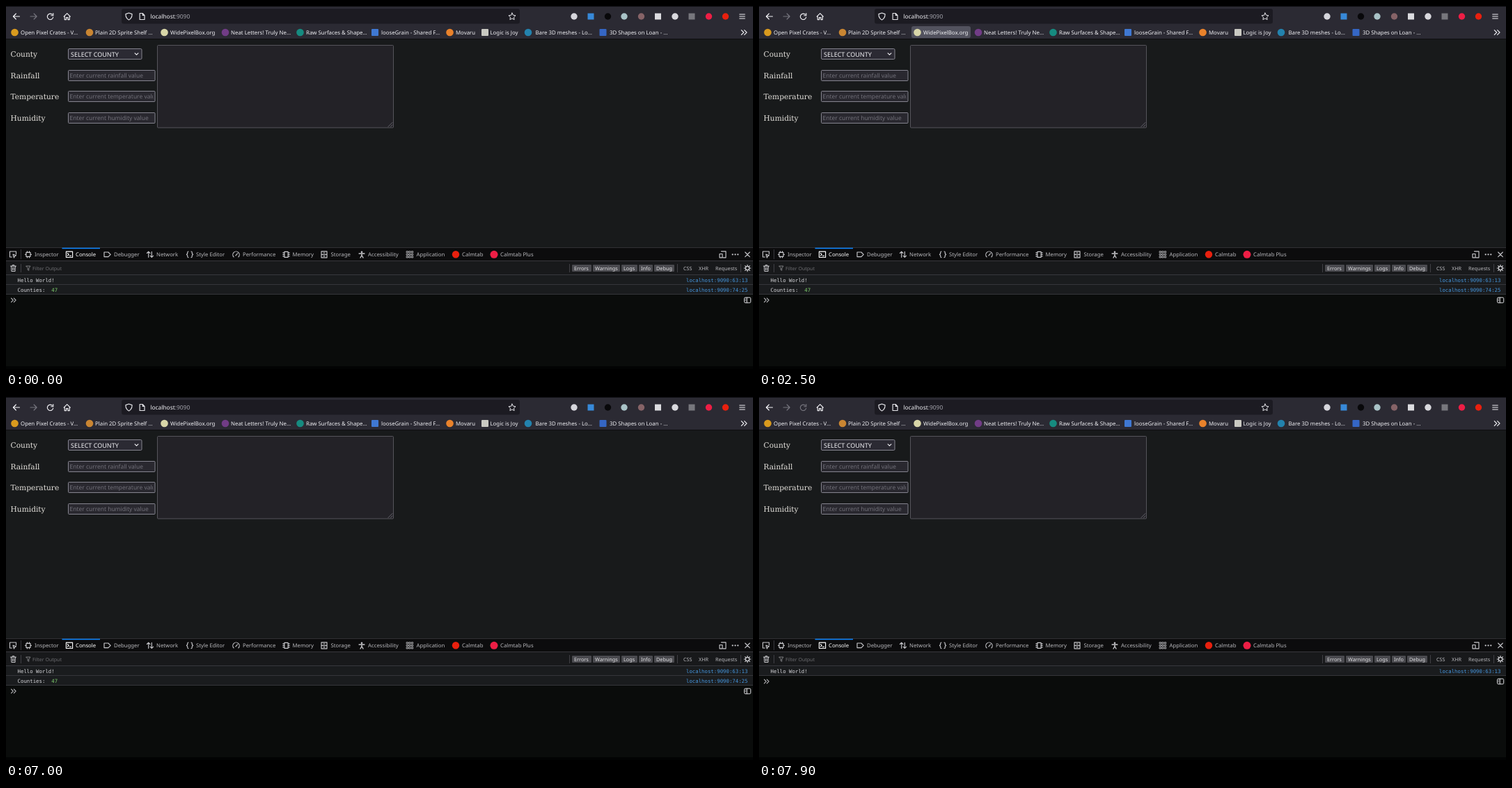
Write an HTML page with a canvas that moves like this. It is 1073x522 px and loops after 8 s.

```html
<!DOCTYPE html>
<html lang="en">
<head>
<meta charset="utf-8">
<title>County form</title>
<style>
html, body { margin: 0; width: 100%; height: 100%; overflow: hidden; background: #0b0d0c; }
canvas, svg { position: absolute; left: 0; top: 0; width: 1073px; height: 522px; }
text { white-space: pre; text-rendering: geometricPrecision; }
</style>
</head>
<body>
<canvas id="stage" width="1073" height="522"></canvas>
<svg id="labels" viewBox="0 0 1073 522">
  <clipPath id="field"><rect x="90" y="120" width="121.5" height="20"/></clipPath>
</svg>
<script>
const LOOP = 8000;
const SANS = '"Noto Sans", sans-serif';
const SERIF = '"DejaVu Serif", "Noto Serif", serif';
const MONO = '"DejaVu Sans Mono", monospace';
const ctx = document.getElementById('stage').getContext('2d');
const svg = document.getElementById('labels');

function label(str, x, y, size, fill, font = SANS) {
  const el = document.createElementNS('http://www.w3.org/2000/svg', 'text');
  const attrs = { x, y, fill, 'font-size': size, 'font-family': font };
  for (const key in attrs) el.setAttribute(key, attrs[key]);
  el.textContent = str;
  svg.appendChild(el);
  return el;
}
const show = (el, on) => el.setAttribute('visibility', on ? 'visible' : 'hidden');

function rect(x, y, w, h, fill) {
  ctx.fillStyle = fill;
  ctx.fillRect(x, y, w, h);
}
function box(x, y, w, h, r, fill, stroke) {
  ctx.beginPath();
  ctx.roundRect(x, y, w, h, r);
  if (fill) { ctx.fillStyle = fill; ctx.fill(); }
  if (stroke) { ctx.strokeStyle = stroke; ctx.lineWidth = 1; ctx.stroke(); }
}
function dot(x, y, r, fill) {
  ctx.beginPath();
  ctx.arc(x, y, r, 0, 7);
  ctx.fillStyle = fill;
  ctx.fill();
}
// Strokes a path whose coordinates are relative to (x, y).
function icon(x, y, d, color = '#e6e6ea', width = 1.15, turn = 0) {
  ctx.save();
  ctx.translate(x, y);
  ctx.rotate(turn);
  ctx.strokeStyle = color;
  ctx.lineWidth = width;
  ctx.lineCap = ctx.lineJoin = 'round';
  ctx.stroke(new Path2D(d));
  ctx.restore();
}

const ring = r => `M${-r} 0a${r} ${r} 0 1 0 ${2 * r} 0a${r} ${r} 0 1 0 ${-2 * r} 0`;
const square = r => `M${-r} ${-r}h${2 * r}v${2 * r}h${-2 * r}z`;
const CROSS = 'M-3.3 -3.3L3.3 3.3M3.3 -3.3L-3.3 3.3';
const RELOAD = 'M4.2 .8A4.2 4.2 0 1 1 2.9 -3M4.3 -4.6V-1.5H1.2';
const HOME = 'M-4.6 0L0 -4.5L4.6 0M-3.5 -.8V4.4H-1.2V1.4H1.2V4.4H3.5V-.8';
const CHEVRONS = 'M-3.2 -2.8L-.4 0L-3.2 2.8M.6 -2.8L3.4 0L.6 2.8';

const bookmarks = [
  [12.5, 21, 'Open Pixel Crates - V…', '#d99a1e'],
  [120, 128, 'Plain 2D Sprite Shelf …', '#c98532'],
  [227.5, 236, 'WidePixelBox.org', '#d8d6a8'],
  [315, 323, 'Neat Letters! Truly Ne…', '#713c86'],
  [422.5, 431, 'Raw Surfaces & Shape…', '#168b80'],
  [530, 539, 'looseGrain - Shared F…', '#3f78d2', true],
  [637.5, 646, 'Movaru', '#e9822b'],
  [688, 695.5, 'Logic is Joy', '#c9c9c2', true],
  [750, 760.5, 'Bare 3D meshes - Lo…', '#2382ad'],
  [857.5, 867, '3D Shapes on Loan - …', '#3566c4', true]
];
const extensions = [
  [816, '#d6d6dc'], [840, '#3789d8', true], [864.5, '#08080a'], [888, '#a9c3c7'],
  [912.5, '#866367'], [936.5, '#dcdce0', true], [961, '#d9d9de'],
  [985, '#77777d', true], [1009.5, '#ed1e45'], [1033.5, '#e8200e']
];
const tabs = [
  [41, 'Inspector'], [100, 'Console'], [155, 'Debugger'], [216, 'Network'],
  [273, 'Style Editor'], [340, 'Performance'], [411.5, 'Memory'], [466.5, 'Storage'],
  [520, 'Accessibility'], [589.5, 'Application'], [655, 'Calmtab'], [710, 'Calmtab Plus']
];
const filters = [
  [813, 28, 'Errors'], [843, 39, 'Warnings'], [884, 23, 'Logs'],
  [909, 20, 'Info'], [931, 29, 'Debug']
];
const fields = [
  [92, 'Enter current rainfall value'],
  [122, 'Enter current temperature value'],
  [153, 'Enter current humidity value']
];

label('localhost', 207.3, 18, 8.4, '#f4f4f8');
label(':9090', 242.8, 18, 8.4, '#a3a3ab');
bookmarks.forEach(([, x, str]) => label(str, x, 40.8, 7.85, '#f0f0f4'));
['County', 'Rainfall', 'Temperature', 'Humidity'].forEach((str, i) =>
  label(str, 6.5, 73 + 30.6 * i, 10.65, '#e5e2dd', SERIF));
label('SELECT COUNTY', 93, 72.5, 9, '#f2f2f5');
fields.forEach(([y, str]) => {
  const el = label(str, 91.5, y + 11.2, 8.45, '#72717a');
  if (y === 122) el.setAttribute('clip-path', 'url(#field)');
});
tabs.forEach(([x, str]) => label(str, x, 360.2, 7.75, str === 'Console' ? '#ffffff' : '#b8b8bc'));
label('Filter Output', 38, 379.6, 7, '#6c6c70');
filters.forEach(([x, , str]) => label(str, x + 3, 379.7, 7.3, '#e2e2e4'));
[[973, 'CSS'], [995, 'XHR'], [1019, 'Requests']].forEach(([x, str]) =>
  label(str, x, 379.7, 7.25, '#b8b8bc'));

const logs = [
  [label('Hello World!', 16.6, 396.6, 7.35, '#d5d5d9', MONO),
   label('localhost:9090:63:13', 977, 396.6, 7.35, '#4697df', MONO)],
  [label('Counties:', 16.6, 410.6, 7.35, '#d5d5d9', MONO),
   label('47', 65.3, 410.6, 7.35, '#80d370', MONO),
   label('localhost:9090:74:25', 977, 410.6, 7.35, '#4697df', MONO)]
];
const tipText = label('Larkfin ESR', 15, 518.8, 9.7, '#e4e4e4');
const statusText = label('Transferring data from localhost:9090…', 6, 344.6, 7.85, '#d8d8de');

function drawToolbar(t) {
  rect(0, 0, 1073, 47, '#2b2a33');
  rect(0, 0, 1073, 1, '#0d0d10');
  rect(0, 47, 1073, 1, '#0e0e10');
  box(166, 4, 572, 21.5, 3, '#1c1b22');
  if (t >= 700 && t < 800) box(77, 4, 22, 22, 3, '#52525e');
  if (t >= 2500 && t < 2600) box(219, 29, 85, 17, 3, '#52525e');

  icon(15, 15, 'M4.5 0H-4.4M-.6 -4L-4.6 0L-.6 4', '#f4f4f8');
  icon(39.5, 15, 'M-4.5 0H4.4M.6 -4L4.6 0L.6 4', '#77767f');
  if (t >= 7300 && t < 7800) icon(63.5, 15, CROSS, '#f4f4f8');
  else icon(63.5, 15.2, RELOAD, t >= 7800 ? '#77767f' : '#f4f4f8', 1.15,
    t >= 7100 && t < 7300 ? -2.4 : 0);
  icon(87.7, 15.2, HOME, '#f4f4f8');
  icon(176.5, 15, 'M0 -5L4.6 -3.4C4.6 1 3 3.7 0 5C-3 3.7 -4.6 1 -4.6 -3.4z');
  icon(195.5, 15, 'M-3.4 -4.5H.7L3.5 -1.7V4.5H-3.4zM.7 -4.5V-1.7H3.5');
  let star = '';
  for (let i = 0; i < 10; i++) {
    const r = i % 2 ? 2.6 : 5.3, a = i * Math.PI / 5;
    star += (i ? 'L' : 'M') + r * Math.sin(a) + ' ' + -r * Math.cos(a);
  }
  icon(727, 15.3, star + 'z', '#e6e6ea', 1);
  extensions.forEach(([x, c, sq]) => sq ? rect(x - 4.5, 10.5, 9, 9, c) : dot(x, 15, 4.7, c));
  icon(1057.5, 15, 'M-3.8 -3H3.8M-3.8 0H3.8M-3.8 3H3.8', '#f0f0f4', 1);
  bookmarks.forEach(([x, , , c, sq]) => sq ? box(x - 5, 33, 10, 10, 1, c) : dot(x, 38, 5.3, c));
  icon(1060, 38, 'M-3.7 -3.4L-.3 0L-3.7 3.4M.6 -3.4L4 0L.6 3.4', '#f0f0f4');
}

function drawPage(t) {
  rect(0, 48, 1073, 300, '#181a1b');
  const hover = t >= 500 && t < 600;
  box(89.5, 61.5, 105.5, 15, 1.5, hover ? '#3a3944' : '#2b2a33', hover ? '#b8b8c4' : '#85848f');
  icon(187.5, 69, 'M-2.4 -1.2L0 1.2L2.4 -1.2', '#f0f0f4');
  fields.forEach(([y]) => box(89.5, y + .5, 124.5, 15, 1, '#29282f', '#85848f'));
  box(217.5, 56.5, 339, 118.5, 1, '#232227', '#55545b');
  icon(555, 174, 'M-6 -.5L0 -6.5M-2.5 -.5L0 -3', '#77767f', .8);
  // status bubble while the page is loading
  const loading = t >= 7300 && t < 7600;
  const alpha = t < 7400 ? .5 : 1;
  show(statusText, loading);
  statusText.setAttribute('opacity', alpha);
  if (loading) {
    ctx.globalAlpha = alpha;
    box(2, 335, 174, 12.5, 1, '#2b2a33');
    ctx.globalAlpha = 1;
  }
}

function drawTabs() {
  rect(0, 348, 1073, 19, '#0c0c0d');
  rect(0, 347, 1073, 1, '#303034');
  rect(0, 366, 1073, 1, '#38383d');
  rect(80.5, 347.7, 54.5, 1.5, '#0a84ff');
  rect(21, 350, 1, 14, '#38383d');
  const c = '#c8c8cc';
  icon(10, 357.5, 'M4.5 -.5V-4.5H-4.5V3.5H-1.5M0 -.5L4.5 1.2L2.4 2.2L1.5 4.5z', c, 1.1);
  icon(32, 357.3, square(3) + 'M-1.5 -4.5V-3M1.5 -4.5V-3M-1.5 3V4.5M1.5 3V4.5M-4.5 0H-3M3 0H4.5', c);
  icon(91, 357.3, 'M-4.6 -4.2H4.6V4.2H-4.6zM-2.6 -1.8L-.8 0L-2.6 1.8M.4 2H2.5', '#ffffff');
  icon(145.5, 357.3, 'M-4.5 -3.3H1.4L4.7 0L1.4 3.3H-4.5z', c);
  icon(207, 357.3, 'M-2.3 4V-4M-4.6 -1.8L-2.3 -4.1L-.1 -1.8M2.3 -4V4M.1 1.8L2.3 4.1L4.6 1.8', c);
  icon(264, 357.3, 'M-2 -4.3Q-3.3 -4.3 -3.3 -2.8V-1.3L-4.6 0L-3.3 1.3V2.8Q-3.3 4.3 -2 4.3' +
    'M2 -4.3Q3.3 -4.3 3.3 -2.8V-1.3L4.6 0L3.3 1.3V2.8Q3.3 4.3 2 4.3', c);
  icon(330.5, 357.5, 'M-3.4 3.4A4.7 4.7 0 1 1 3.4 3.4M-.6 1.3L2 -1.6', c);
  icon(402.5, 357.3, 'M-2.6 -4H2.6V4H-2.6zM-4.7 -2.5H-3M-4.7 0H-3M-4.7 2.5H-3M3 -2.5H4.7M3 0H4.7M3 2.5H4.7', c);
  icon(457, 357.3, 'M-4 -4.5H4V4.5H-4zM-4 0H4M-1 -2.3H1M-1 2.3H1', c);
  dot(511, 353.7, 1.3, c);
  icon(511, 357.5, 'M-3.9 -1.5H3.9M0 -1.5V1L-2 4.5M0 1L2 4.5', c, 1.4);
  for (let i = 0; i < 9; i++)
    icon(576.5 + i % 3 * 3.6, 353.7 + Math.floor(i / 3) * 3.6, square(1), c, .8);
  dot(646, 357.3, 5.2, '#e8200e');
  dot(701, 357.3, 5.5, '#ed1e45');
  icon(1029.5, 357.3, 'M-2 -4.5H4.5V4.5H.5M-4.5 -.8H-.5V4.5H-4.5z', c);
  [-3.8, 0, 3.8].forEach(d => dot(1047.5 + d, 357.3, 1.15, c));
  icon(1065, 357.3, CROSS, c);
}

function drawConsole(t) {
  rect(0, 367, 1073, 20, '#18191b');
  rect(0, 386, 1073, 1, '#38383d');
  [21, 809, 964, 1055].forEach(x => rect(x, 371, 1, 12, '#404045'));
  icon(10.5, 377, 'M-4 -2.9H4M-1.3 -2.9V-4.5H1.3V-2.9M-3 -2.9L-2.6 4.5H2.6L3 -2.9M-1 -.8V2.6M1 -.8V2.6', '#c8c8cc', 1);
  icon(32, 377, 'M-3 -3H3L.8 0V3.3L-.8 2.4V0z', '#88888c', .9);
  filters.forEach(([x, w]) => box(x, 372, w, 10, 1, '#4a4a4f'));
  let gear = ring(2.7);
  for (let i = 0; i < 8; i++) {
    const c = Math.cos(i * Math.PI / 4), s = Math.sin(i * Math.PI / 4);
    gear += `M${3.3 * c} ${3.3 * s}L${4.7 * c} ${4.7 * s}`;
  }
  icon(1065, 377, gear, '#d0d0d4', 1.2);

  rect(0, 387, 1073, 135, '#0a0c0b');
  const rows = t < 7100 ? 2 : t < 7900 ? 0 : 1;
  logs.forEach((parts, i) => {
    parts.forEach(el => show(el, i < rows));
    if (i < rows) {
      rect(0, 387 + i * 14, 1073, 14, '#1a1c1e');
      rect(0, 400 + i * 14, 1073, 1, '#35363a');
    }
  });
  const y = 395 + rows * 14;
  icon(10.7, y, CHEVRONS, '#b4b4b8', 1.1);
  box(1060.5, y - 3.8, 9.2, 7.6, 1.5, null, '#dadade');
  icon(1065, y, 'M-.8 -3.6V3.6M-2.7 -1.5H-2.5M-2.7 .6H-2.5', '#dadade', 1.1);
  rect(0, 518, 1073, 4, '#020303');

  const tip = (t >= 5900 && t < 6000) || (t >= 6300 && t < 6400);
  show(tipText, tip);
  if (tip) box(7, 505, 66, 22, 10, '#222324');
}

function frame(now) {
  const t = now % LOOP;
  drawToolbar(t);
  drawPage(t);
  drawTabs();
  drawConsole(t);
  requestAnimationFrame(frame);
}
frame(0);
</script>
</body>
</html>
```
